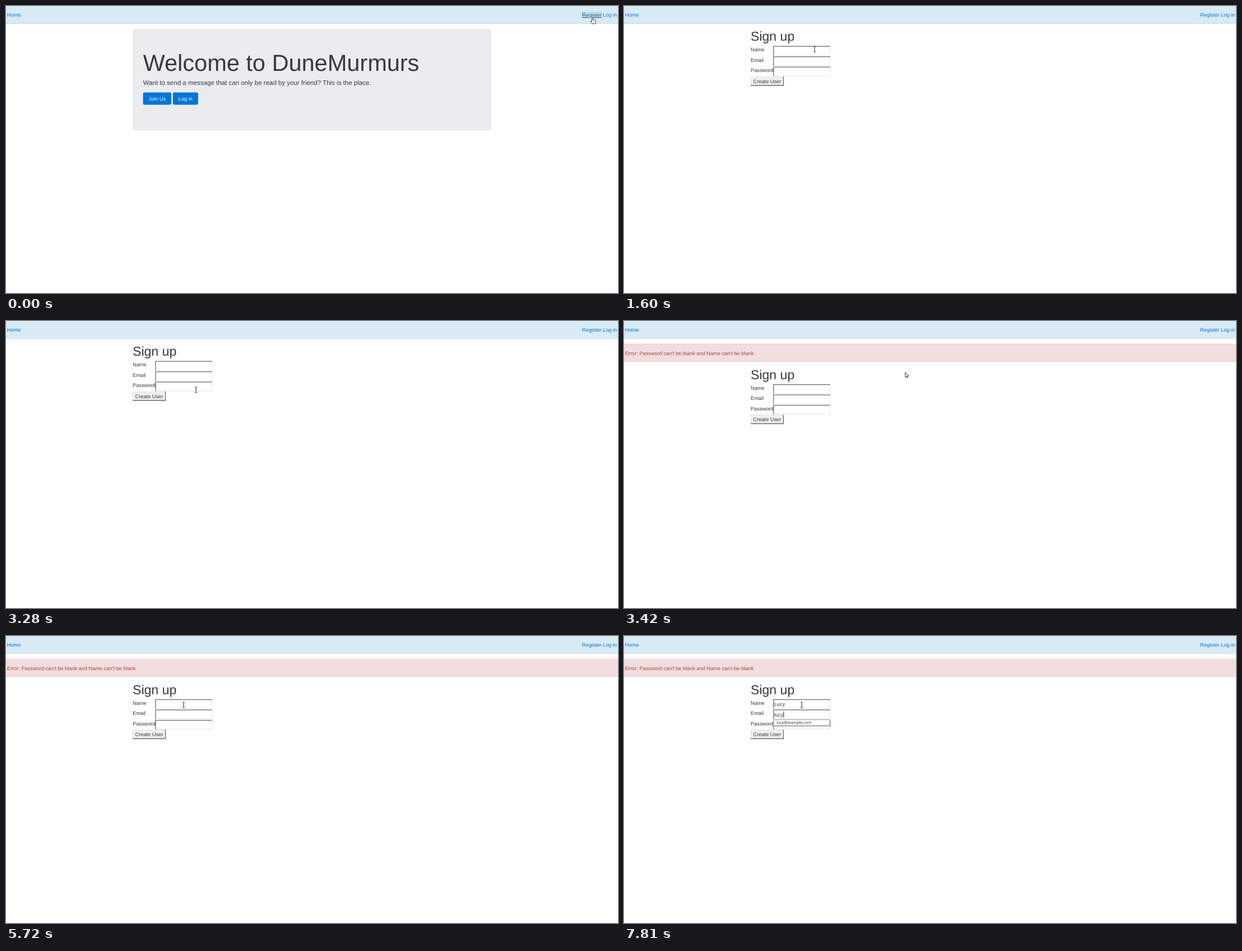
These frames come from a looping animation (1092x513 px, 8 s). An HTML page:

```html
<!DOCTYPE html>
<html lang="en">
<head>
<meta charset="utf-8">
<title>Sign up</title>
<style>
  html, body { margin: 0; width: 100%; height: 100%; overflow: hidden; background: #fefefe; }
  svg { display: block; width: 100%; height: 100%; }
  text { font: 9.23px "Liberation Sans", Arial, sans-serif; fill: #373a3c; text-rendering: geometricPrecision; white-space: pre; }
  .link { fill: #0275d8; }
  .hover { fill: #014c8c; text-decoration: underline; }
  .title { font-size: 41.5px; }
  .lead { font-size: 11.54px; }
  .heading { font-size: 23.08px; }
  .on-blue { fill: #fff; }
  .error { fill: #a94442; }
  .suggestion { font: 6.9px "Open Sans", sans-serif; fill: #222; }
  .dark { fill: none; stroke: #686868; stroke-width: 1.3; }
  .light { fill: none; stroke: #e4e4e4; stroke-width: 1; }
</style>
</head>
<body>
<svg viewBox="0 0 1092 513">
  <rect width="1092" height="513" fill="#fefefe"/>
  <rect width="1092" height="31.5" fill="#d8ebf5"/>
  <rect y="31" width="1092" height="1" fill="#c6e0ec"/>
  <text class="link" x="1.8" y="19.1">Home</text>
  <text class="link" id="register" x="1028.1" y="19.1">Register</text>
  <text class="link" x="1065.1" y="19.1">Log in</text>

  <g id="home">
    <rect x="1028.5" y="11.5" width="34" height="9.5" fill="none" stroke="#3c6f9c" stroke-width=".8" stroke-dasharray="1 1"/>
    <rect x="226" y="41" width="640" height="181.5" rx="2.8" fill="#ebecee"/>
    <text class="title" x="244.6" y="115.5">Welcome to DuneMurmurs</text>
    <text class="lead" x="244.6" y="140.6">Want to send a message that can only be read by your friend? This is the place.</text>
    <g fill="#0275d8">
      <rect x="244.5" y="154.4" width="50.4" height="22" rx="2.3"/>
      <rect x="297.8" y="154.4" width="45" height="22" rx="2.3"/>
    </g>
    <text class="on-blue" x="254.3" y="168.8">Join Us</text>
    <text class="on-blue" x="307.6" y="168.8">Log in</text>
  </g>

  <g id="alert">
    <rect y="41" width="1092" height="32" fill="#f2dede"/>
    <path d="M0 41.3H1092M0 72.7H1092" stroke="#e9cccc" stroke-width=".8"/>
    <text class="error" x="1.8" y="60.6">Error: Password can't be blank and Name can't be blank</text>
  </g>

  <g id="form">
    <text class="heading" x="226" y="62">Sign up</text>
    <g id="fields"></g>
    <rect x="226" y="126" width="59" height="16.5" fill="#efefef"/>
    <path id="buttonTop" d="M226.5 142V126.5H285"/>
    <path id="buttonBottom" d="M226 142H284.5V126"/>
    <text x="230.6" y="137.7">Create User</text>
    <g id="popup">
      <rect x="267.5" y="109" width="101.3" height="11" fill="#999"/>
      <rect x="266.5" y="108.2" width="100.8" height="10.5" rx=".8" fill="#fff" stroke="#8a8a8a" stroke-width=".9"/>
      <text class="suggestion" id="suggestion" x="272.3" y="115.8"></text>
    </g>
    <rect id="caret" width="1" height="11" fill="#222"/>
  </g>

  <g id="cursor" stroke="#222" stroke-linejoin="round">
    <path id="hand" fill="#fff" stroke-width=".9" d="M-1 6V.8Q0-.5 1 .8V4.2L5 5Q6 5.4 5.8 6.8L5 11.5H-.2L-3.3 7.3Q-3.2 5.8-2 6.3L-1 7.5Z"/>
    <path id="arrow" fill="#fff" stroke-width=".9" d="M0 0V9L2 7.3L3.4 10.4L4.8 9.8L3.5 6.8H6.2Z"/>
    <path id="beam" fill="none" stroke-width="1" d="M-2-4.8H-.6L0-4.3L.6-4.8H2M0-4.3V4.6M-2 5H-.6L0 4.6L.6 5H2"/>
  </g>
</svg>
<script>
const LOOP = 8000, ROW = 18.5, ALERT_SHIFT = 41.5;
const el = id => document.getElementById(id);
const show = (id, on) => el(id).setAttribute('display', on ? 'inline' : 'none');
const move = (id, x, y) => el(id).setAttribute('transform', `translate(${x} ${y})`);
const between = (t, from, to) => t >= from && t < to;

el('fields').innerHTML = ['Name', 'Email', 'Password'].map((label, i) => `
  <g transform="translate(0 ${i * ROW})">
    <text x="226" y="81.3">${label}</text>
    <rect x="266.5" y="71.5" width="101" height="17" fill="#fff"/>
    <path class="light" d="M267 88H367.5V72"/>
    <path class="dark" d="M266.8 88.5V72.1H368"/>
    <text id="value${i}" x="267.9" y="83.5"></text>
  </g>`).join('');

// Pointer runs: each holds its points for one step, then rests on the last.
const runs = [
  { start: 0, step: 320, points: [[1046.5, 20.3]] },
  { start: 320, step: 142, points: [[574, 49.5], [520, 58], [450, 68], [390, 75], [352, 77], [340, 77]] },
  { start: 2010, step: 140, points: [[338, 82], [328, 97], [306, 114], [282, 126], [268, 131], [264, 131], [264, 131], [266, 131]] },
  { start: 3140, step: 143, points: [[295, 129], [339, 123], [501.8, 91.5], [610, 77], [745, 56], [875, 33], [975, 15], [1024, 9]] },
  { start: 4280, step: 143, points: [[900, 30], [670, 68], [440, 108], [300, 128], [254, 129], [288, 126], [317, 123]] }
];

const typing = [
  { row: 0, word: 'Lucy', hint: 'Lucy', keys: [[6430, 1], [6570, 3], [6700, 4]], end: 6840 },
  { row: 1, word: 'lucy', hint: 'lucy@example.com', keys: [[7540, 1], [7680, 3], [7810, 4]], end: LOOP }
];

// Visible caret spans: from, to, row
const carets = [[1030, 1600, 0], [2150, 2710, 0], [5140, 5720, 0], [6290, 6840, 0], [6840, 7400, 1], [7540, LOOP, 1]];

function drawCursor(t, shift) {
  const run = runs.findLast(r => t >= r.start);
  const index = Math.min(run.points.length - 1, Math.floor((t - run.start + 8) / run.step));
  const [x, y] = run.points[index];
  const rowY = (y - shift - 71.5) % ROW;
  const inField = x > 267 && x < 368 && y > shift + 71.5 && y < shift + 125.5 && rowY < 17;
  const kind = t < 320 ? 'hand' : inField ? 'beam' : 'arrow';
  for (const name of ['hand', 'arrow', 'beam']) show(name, name === kind);
  move('cursor', x, y);
}

function drawTyping(t) {
  show('popup', false);
  for (const { row, word, hint, keys, end } of typing) {
    const key = keys.findLast(([time]) => t >= time);
    el('value' + row).textContent = key ? word.slice(0, key[1]) : '';
    if (key && t < end) {
      show('popup', true);
      move('popup', 0, (row - 1) * ROW);
      el('suggestion').textContent = hint;
    }
  }
  const caret = carets.find(([from, to]) => between(t, from, to));
  show('caret', caret);
  if (caret) {
    const value = el('value' + caret[2]);
    const width = value.textContent ? value.getComputedTextLength() : 0;
    move('caret', 268 + width, 75 + caret[2] * ROW);
  }
}

function draw(t) {
  const failed = t >= 3420, shift = failed ? ALERT_SHIFT : 0;
  show('home', t < 320);
  show('form', t >= 320);
  show('alert', failed);
  move('form', 0, shift);
  el('register').setAttribute('class', t < 320 ? 'link hover' : 'link');
  const pressed = between(t, 2710, 2850);
  el('buttonTop').setAttribute('class', pressed ? 'dark' : 'light');
  el('buttonBottom').setAttribute('class', pressed ? 'light' : 'dark');
  drawTyping(t);
  drawCursor(t, shift);
}

const begin = performance.now();
function tick() {
  draw((performance.now() - begin) % LOOP);
  requestAnimationFrame(tick);
}
tick();
</script>
</body>
</html>
```
